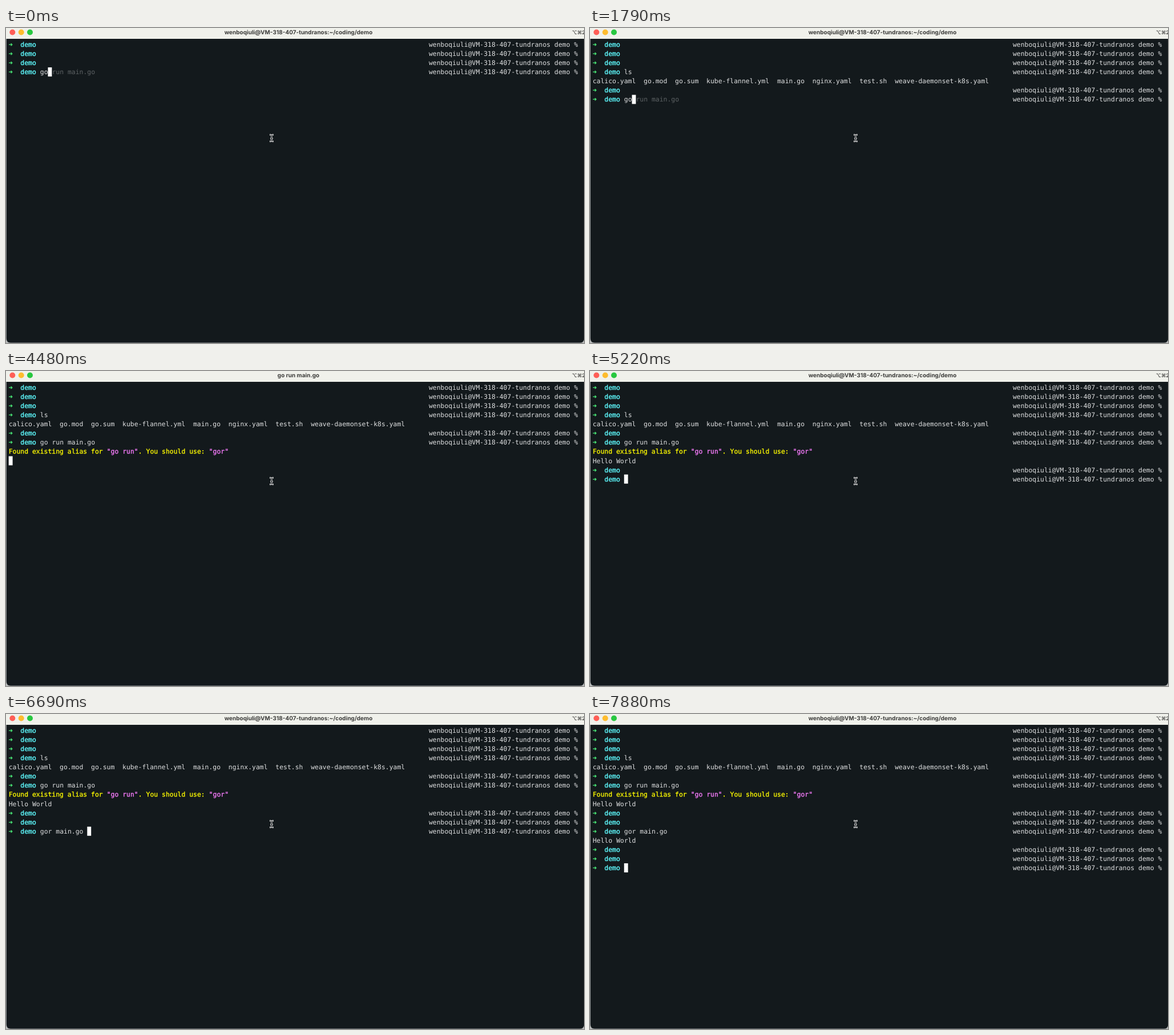
Write an HTML page that moves like this. It is 1013 px wide and 553 px high and loops after 8 s.

```html
<!DOCTYPE html>
<html lang="en">
<head>
<meta charset="utf-8">
<title>Terminal</title>
<style>
  html, body { margin: 0; width: 100%; height: 100%; overflow: hidden; background: #b9bbbb; }
  svg { display: block; width: 1013px; height: 553px; }
  text { white-space: pre; text-rendering: geometricPrecision; }
  #screen { font: 11.43px "DejaVu Sans Mono", monospace; fill: #dfe0e1; }
  #screen .arrow { fill: #4bea78; stroke: #4bea78; }
  #screen .dir { fill: #5ffbff; stroke: #5ffbff; }
  #screen .note { fill: #f8f500; stroke: #f8f500; }
  #screen .quote { fill: #f57bfa; stroke: #f57bfa; }
  #screen .arrow, #screen .dir, #screen .note, #screen .quote { stroke-width: .35px; }
  #screen .hint { fill: #5d6264; }
  #screen .under { fill: #13191c; }
  #title { font: bold 10px Inter, sans-serif; fill: #3d3d3b; }
  #keys { font: bold 9px Inter, "DejaVu Sans", sans-serif; fill: #555553; }
</style>
</head>
<body>
<svg viewBox="0 0 1013 553">
  <defs>
    <path id="beam" d="M463.2 187.5Q465.5 187.5 465.5 190V196.5Q465.5 199 463.2 199M467.8 187.5Q465.5 187.5 465.5 190M465.5 196.5Q465.5 199 467.8 199M464.5 194H466.5"/>
  </defs>
  <path d="M.8 0H1013V547Q1012 552.5 1006 552.5H8Q.8 552.5 .8 545Z" fill="#13191c"/>
  <rect width="1013" height="19" fill="#f0f1eb"/>
  <circle cx="11.3" cy="7.5" r="5" fill="#fe5f57"/>
  <circle cx="26.7" cy="7.5" r="5" fill="#febc2e"/>
  <circle cx="42" cy="7.5" r="5" fill="#28c840"/>
  <text id="title" x="512.5" y="11" text-anchor="middle"></text>
  <text id="keys" x="991.7" y="10.5">⌥⌘2</text>
  <g id="screen"></g>
  <g fill="none" stroke-linecap="square">
    <use href="#beam" stroke="#f4f4f4" stroke-width="2.3"/>
    <use href="#beam" stroke="#111517" stroke-width=".9"/>
  </g>
</svg>
<script>
const LOOP = 8000;
const LEFT = 4.7, CELL = 6.881, TOP = 20.9, ROW = 16.08;
const INPUT_COL = 8, RIGHT_COL = 107;
const HOST = 'wenboqiuli@VM-318-407-tundranos';
const HOME_TITLE = HOST + ':~/coding/demo';

const screenEl = document.getElementById('screen');
const titleEl = document.getElementById('title');

const colX = col => (LEFT + col * CELL).toFixed(2);
const rowY = (row, offset = 0) => (TOP + row * ROW + offset).toFixed(2);

function put(row, col, str, cls = '') {
  return `<text class="${cls}" x="${colX(col)}" y="${rowY(row, 12)}">${str}</text>`;
}

function drawLine(line, row) {
  if (line.spans) {
    let col = 0;
    return line.spans.map(([str, cls]) => {
      const part = put(row, col, str, cls);
      col += str.length;
      return part;
    }).join('');
  }
  return put(row, 0, '➜', 'arrow') + put(row, 3, 'demo', 'dir') +
    put(row, INPUT_COL, line.input) +
    put(row, INPUT_COL + line.input.length, line.hint, 'hint') +
    put(row, RIGHT_COL, HOST + ' demo %');
}

function drawCursor(line, row) {
  const col = line.spans ? 0 : INPUT_COL + line.input.length;
  const under = line.hint ? put(row, col, line.hint[0], 'under') : '';
  return `<rect x="${colX(col)}" y="${rowY(row)}" width="${CELL}" height="16" fill="#fff"/>` + under;
}

// Each step changes the terminal and stores the resulting view.
const prompt = () => ({ input: '', hint: '' });
const output = (...spans) => ({ spans });
const lines = [prompt(), prompt(), prompt(), prompt()];
const views = [];

function save(time, title = HOME_TITLE) {
  const last = lines.length - 1;
  views.push({ time, title, markup: lines.map(drawLine).join('') + drawCursor(lines[last], last) });
}
function type(time, input, hint = '') {
  Object.assign(lines[lines.length - 1], { input, hint });
  save(time);
}
function enter(time, ...printed) {
  lines.push(...printed, prompt());
  save(time);
}

type(0, 'go', ' run main.go');
type(600, '');
type(1050, 'ls');
enter(1200, output(['calico.yaml  go.mod  go.sum  kube-flannel.yml  main.go  nginx.yaml  test.sh  weave-daemonset-k8s.yaml']));
enter(1350);
type(1790, 'go', ' run main.go');
type(2990, 'go ', 'run main.go');
type(3440, 'go run main.go');

// While the command runs, the title names it and the cursor waits below.
lines.push(
  output(['Found existing alias for ', 'note'], ['"go run"', 'quote'],
    ['. You should use: ', 'note'], ['"gor"', 'quote']),
  output()
);
save(4480, 'go run main.go');
lines.pop();
enter(4620, output(['Hello World']));
enter(5220);
enter(5370);

type(5660, 'go', ' run main.go');
type(6250, 'gor ');
type(6400, 'gor m');
type(6540, 'gor ma');
type(6690, 'gor main.go ');
enter(7290, output(['Hello World']));
enter(7730);
enter(7880);

let shown;
function render(time) {
  const view = views.findLast(v => v.time <= time);
  if (view === shown) return;
  shown = view;
  screenEl.innerHTML = view.markup;
  titleEl.textContent = view.title;
}

const start = performance.now();
function tick() {
  render((performance.now() - start) % LOOP);
  requestAnimationFrame(tick);
}
tick();
</script>
</body>
</html>
```
